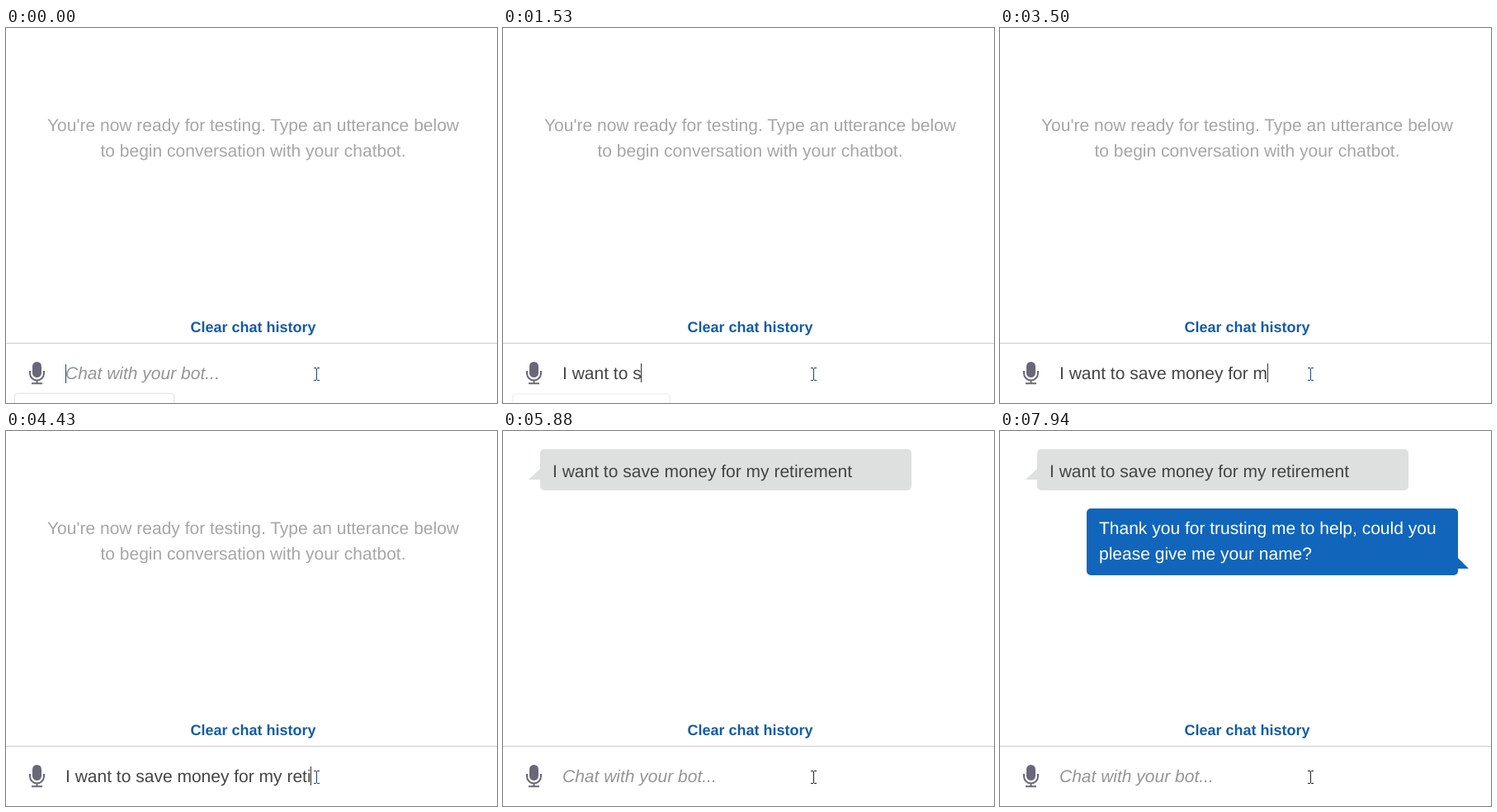
These frames come from a looping animation (595 by 455 pixels, 8 s). An HTML page:

```html
<!DOCTYPE html>
<html lang="en">
<head>
<meta charset="utf-8">
<title>Chat test</title>
<style>
  html, body { margin: 0; width: 100%; height: 100%; overflow: hidden; background: #fff; }
  svg { display: block; }
  text { font: 21px "Liberation Sans", Arial, sans-serif; white-space: pre; text-rendering: geometricPrecision; }
  .mid { text-anchor: middle; }
  #intro { fill: #a6a6a6; }
  #user text, #typed { fill: #444; }
  #reply text { fill: #fff; }
  #hint { fill: #959595; font-style: italic; }
  #clear { fill: #145ca6; font-size: 18px; font-weight: bold; }
</style>
</head>
<body>
<svg width="595" height="455" viewBox="0 0 595 455">
  <g id="intro" class="mid">
    <text x="299.5" y="125">You're now ready for testing. Type an utterance below</text>
    <text x="299.5" y="156">to begin conversation with your chatbot.</text>
  </g>
  <g id="user">
    <path d="M46 45V59H31Z" fill="#dde0df"/>
    <rect x="45" y="22" width="450" height="50" rx="5" fill="#dde0df"/>
    <text x="60" y="56">I want to save money for my retirement</text>
  </g>
  <g id="reply">
    <path d="M554 153V167H568Z" fill="#1166bb"/>
    <rect x="105" y="94" width="450" height="81" rx="5" fill="#1166bb"/>
    <text x="120" y="125">Thank you for trusting me to help, could you</text>
    <text x="120" y="156">please give me your name?</text>
  </g>

  <text id="clear" class="mid" x="299.5" y="369">Clear chat history</text>
  <rect y="382" width="595" height="1" fill="#ccc"/>

  <g fill="none" stroke="#686878" stroke-width="2">
    <rect x="32" y="405" width="11" height="19" rx="5.5" fill="#686878" stroke="none"/>
    <path d="M29 416V419A8.5 8.5 0 0 0 46 419V416M37.5 427V431M31 431.2H44"/>
  </g>

  <text id="hint" x="72" y="426">Chat with your bot...</text>
  <text id="typed" x="72" y="426"></text>
  <rect id="caret" width="1" height="23"/>
  <path id="pointer" d="M373 412.5H376M377 412.5H380M376.5 413V427M373 427.5H376M377 427.5H380" fill="none"/>

  <g id="popup" fill="#fff">
    <rect x="10" y="443.5" width="194" height="30" rx="4" stroke="#f4f4f4" stroke-width="2"/>
    <rect x="10.5" y="443.5" width="193" height="30" rx="3.5" stroke="#e6e6e6"/>
  </g>
</svg>
<script>
const LOOP = 8000, SENT = 5880, REPLIED = 6280;
const message = "I want to save money for my retirement";

// Bursts of key presses: first time, last time, count
const bursts = [
  [130, 200, 2], [400, 400, 1], [600, 670, 2], [870, 870, 1], [1010, 1330, 4],
  [1470, 1470, 1], [1670, 1930, 3], [2070, 2070, 1], [2240, 2430, 3],
  [2630, 3060, 5], [3230, 3230, 1], [3370, 3500, 2], [3690, 3690, 1],
  [3830, 3890, 2], [4030, 4030, 1], [4290, 4290, 1], [4430, 4560, 2], [4760, 5280, 5]
];
const keys = bursts.flatMap(([from, to, n]) =>
  Array.from({ length: n }, (_, i) => from + (n > 1 ? (to - from) * i / (n - 1) : 0)));
const blinks = [6410, 6880, 7410, 7940];

const $ = id => document.getElementById(id);
const show = (id, on) => $(id).setAttribute("visibility", on ? "visible" : "hidden");
const countUntil = (times, t) => times.filter(x => x <= t).length;

function draw(t) {
  const sent = t >= SENT;
  const count = sent ? 0 : countUntil(keys, t);
  const typed = $("typed"), caret = $("caret");

  typed.textContent = message.slice(0, count);
  show("hint", !count);
  show("intro", !sent);
  show("user", sent);
  show("reply", t >= REPLIED);

  show("caret", !sent || countUntil(blinks, t) % 2);
  caret.setAttribute("x", Math.floor(72 + (count ? typed.getComputedTextLength() : 0)));
  caret.setAttribute("y", count ? 407 : 408);
  caret.setAttribute("fill", count ? "#333" : "#17496f");
  $("pointer").setAttribute("stroke", sent ? "#222" : "#1d4468");

  // The suggestion box shrinks a little as it fades away
  const closing = t >= 1530;
  show("popup", t < 1670);
  $("popup").setAttribute("opacity", closing ? 0.6 : 1);
  $("popup").setAttribute("transform", closing ? "translate(107 444) scale(.985) translate(-107 -443.5)" : "");
}

const start = performance.now();
function tick() {
  draw((performance.now() - start) % LOOP);
  requestAnimationFrame(tick);
}
tick();
</script>
</body>
</html>
```
